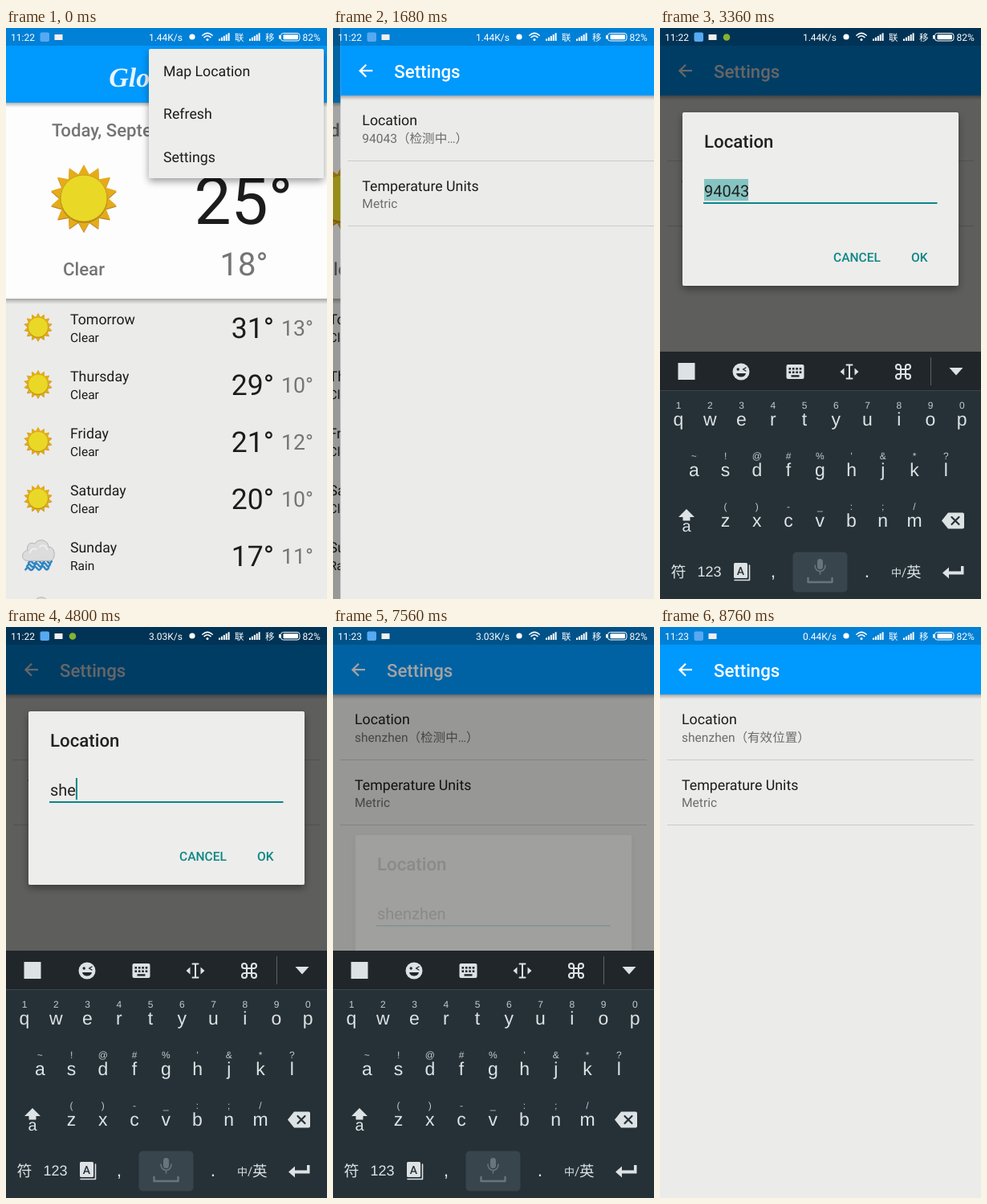
An HTML page that plays this animation: 400x711 px, repeating every 9.12 s.

```html
<!DOCTYPE html>
<html lang="zh-CN">
<head>
<meta charset="utf-8">
<title>Weather settings</title>
<style>
  html, body { margin: 0; width: 100%; height: 100%; overflow: hidden; background: #ebebea; }
  svg { display: block; width: 400px; height: 711px; }
  text { font-family: Roboto, "Noto Sans CJK SC", "Noto Sans CJK", sans-serif; white-space: pre; text-rendering: geometricPrecision; }
  .brand { font-family: "Liberation Serif", "Noto Serif", serif; font-style: italic; font-weight: 700; }
  .key { font-family: "Liberation Sans", "Noto Sans CJK SC", sans-serif; text-anchor: middle; }
  .medium { font-weight: 500; }
  .mid { text-anchor: middle; }
  .end { text-anchor: end; }
  .line { fill: none; stroke-linecap: round; stroke-linejoin: round; }
</style>
</head>
<body>
<svg id="stage" viewBox="0 0 400 711" xmlns="http://www.w3.org/2000/svg"></svg>
<script>
const LOOP = 9120, STEP = 120;
const BLUE = '#0099fd', BAR = '#0080d6', INK = '#1c1c1c', GREY = '#757575';
const TEAL = '#0a8785', KEY = '#dde2e4', DARK = '#20262a', BODY = '#253137';

const text = (x, y, size, str, fill = INK, cls = '', id = '') =>
  `<text x="${x}" y="${y}" font-size="${size}" fill="${fill}" class="${cls}" id="${id}">${str}</text>`;
const rect = (x, y, w, h, fill, more = '') =>
  `<rect x="${x}" y="${y}" width="${w}" height="${h}" fill="${fill}" ${more}/>`;
const path = (d, fill, more = '') => `<path d="${d}" fill="${fill}" ${more}/>`;
const line = (d, color, width) =>
  `<path d="${d}" class="line" stroke="${color}" stroke-width="${width}"/>`;
const circle = (x, y, r, fill, more = '') =>
  `<circle cx="${x}" cy="${y}" r="${r}" fill="${fill}" ${more}/>`;
const at = (x, y, body, scale = 1) =>
  `<g transform="translate(${x} ${y}) scale(${scale})">${body}</g>`;

// Weather icons
function sun(x, y, scale) {
  const rays = 14, pts = [];
  for (let i = 0; i < rays * 2; i++) {
    const a = i * Math.PI / rays - Math.PI / 2, r = i % 2 ? 30.5 : 42;
    pts.push((r * Math.cos(a)).toFixed(1) + ',' + (r * Math.sin(a)).toFixed(1));
  }
  const star = (dy, fill) => `<polygon points="${pts.join(' ')}" fill="${fill}" transform="translate(0 ${dy})"/>`;
  return at(x, y, star(1.2, '#b8862a') + star(0, '#e6ab1a') +
    circle(0, 1.2, 29.5, '#a88318') + circle(0, 0, 29, '#e9d926', 'stroke="#c9a01c" stroke-width="1"'), scale);
}

function rain(x, y) {
  const cloud = 'M-13 11C-22 11-21-1-13-2C-15-10-8-13-4-10C0-18 13-15 13-6C22-7 23 11 14 11Z';
  let drops = '';
  for (let row = 0; row < 3; row++)
    drops += line(`M${-12 - row * 1.8} ${14 + row * 4}` + 'q2.4-4.4 4.8-1t4.8-.5t4.8 0t4.8-.5t4.8 0t4.8-.5', '#2f86c4', 2.6);
  return at(x, y, drops + path(cloud, '#dcdcdc', 'stroke="#b2b2b2" stroke-width="1"') +
    line('M-10 1C-9-4-5-5-2-3M2-6C5-10 10-8 11-3', '#f1f1f1', 1.6));
}

// Home screen
const days = [['Tomorrow', 31, 13], ['Thursday', 29, 10], ['Friday', 21, 12],
  ['Saturday', 20, 10], ['Sunday', 17, 11], ['Monday', 18, 11]];

function dayRow([name, high, low], i) {
  const wet = i > 3;
  return at(0, i * 71.1,
    (wet ? rain(40, 368) : sun(40, 372.5, .425)) +
    text(80, 369, 17.78, name) + text(80, 391, 15.56, wet ? 'Rain' : 'Clear') +
    text(334, 386, 35.56, high + '°', INK, 'end') + text(383, 383, 26.67, low + '°', GREY, 'end'));
}

const home = rect(0, 0, 400, 711, '#ebebea') + days.map(dayRow).join('') +
  rect(0, 337, 400, 7, 'url(#shade)') + rect(0, 93, 400, 244, '#fdfdfd') +
  rect(0, 93, 400, 6, 'url(#shade)') + rect(0, 22, 400, 71, BLUE) + rect(0, 0, 400, 22, BAR) +
  text(200, 73, 34, 'Glowmere', '#e9f4fc', 'brand mid') +
  text(57, 135, 22.22, 'Today, September 27 | 94043', GREY, 'medium') +
  sun(97, 212, 1) + text(71, 308, 22.22, 'Clear', GREY, 'medium') +
  text(234.5, 244, 82, '25°') + text(266.5, 308, 40, '18°', GREY);

const menu = rect(178, 26, 218, 161, '#ededec', 'rx="2" filter="url(#lift)"') +
  rect(178, 134, 218, 53, '#000', 'id="menuTap" opacity="0"') +
  ['Map Location', 'Refresh', 'Settings'].map((s, i) => text(196, 60 + i * 53.4, 17.78, s)).join('');

// Settings screen
const settings = rect(0, 0, 400, 711, '#ebebea') +
  '<g clip-path="url(#rowClip)">' + circle(204, 125, 10, '#000', 'id="ripple" opacity="0"') + '</g>' +
  rect(0, 84, 400, 6, 'url(#shade)') + rect(0, 22, 400, 62, BLUE) + rect(0, 0, 400, 22, BAR) +
  path('M40 52.1V54.3H27.2L32.8 59.9L31.2 61.5L22.8 53.2L31.2 44.9L32.8 46.5L27.2 52.1Z', '#fff') +
  text(67, 62, 22.22, 'Settings', '#fff', 'medium') +
  text(27, 121, 17.78, 'Location') + text(27, 143, 15.56, '', '#6c6c6c', '', 'place') +
  rect(9, 165, 382, 1, '#cbcbca') +
  text(27, 203, 17.78, 'Temperature Units') + text(27, 224, 15.56, 'Metric', '#6c6c6c') +
  rect(9, 246, 382, 1, '#cbcbca');

const dialog = rect(28, 105, 344, 216, '#ededec', 'rx="2" filter="url(#lift)"') +
  text(55, 149, 22.22, 'Location', '#212121', 'medium') +
  rect(55, 188, 55, 27, '#86c4c1', 'id="mark"') +
  text(55, 210, 20, '', '#212121', '', 'entry') +
  rect(54, 217, 291.5, 2, TEAL) + rect(0, 188, 2, 27, TEAL, 'id="caret"') +
  rect(302, 266, 44, 40, '#000', 'rx="2" id="okTap" opacity="0"') +
  text(216, 291, 15.56, 'CANCEL', TEAL, 'medium') + text(313, 291, 15.56, 'OK', TEAL, 'medium');

// Keyboard
const PITCH = 39.25;
const keyRows = [
  { x: 23, y: 495, keys: 'qwertyuiop', hints: '1234567890' },
  { x: 42.3, y: 558, keys: 'asdfghjkl', hints: "~!@#%'&*?" },
  { x: 81.5, y: 621, keys: 'zxcvbnm', hints: '()-_:;/' }
];
const keyPos = {};
const keyCaps = keyRows.map(row => [...row.keys].map((k, i) => {
  const x = row.x + i * PITCH, hint = row.hints[i] === '&' ? '&amp;' : row.hints[i];
  keyPos[k] = [x, row.y];
  return text(x, row.y, 23, k, KEY, 'key') + text(x, row.y - 21.5, 12, hint, '#c3cacd', 'key');
}).join('')).join('');

let dots = '';
for (let i = 0; i < 8; i++) dots += rect(-8 + (i % 4) * 4.4, -5 + (i >> 2) * 4.4, 2.6, 2.6, DARK);

const toolIcons = rect(22.5, 417, 21, 21, KEY) +
  at(101, 428, circle(0, 0, 10.5, KEY) + circle(-3.8, -3, 1.7, DARK) +
    line('M6 -5L2.5 -3L6 -1', DARK, 1.4) + path('M-6 2H6C5 8-5 8-6 2Z', DARK)) +
  at(168.5, 428, rect(-11, -9, 22, 18, KEY, 'rx="2"') + dots + rect(-5, 4.2, 10, 2.4, DARK)) +
  at(236, 428, line('M-3.5 -8.5H3.5M0 -8.5V8.5M-3.5 8.5H3.5', KEY, 2) +
    path('M-6.5 -4.5V4.5L-11.5 0ZM6.5 -4.5V4.5L11.5 0Z', KEY)) +
  at(303, 428, line('M-3-6V6a3 3 0 1 1-3-3H6a3 3 0 1 1-3 3V-6a3 3 0 1 1 3 3H-6a3 3 0 1 1 3-3z', KEY, 2.1)) +
  rect(337, 410, 1, 35, '#5d6468') + path('M360.5 423H377.5L369 432.5Z', KEY);

const bottomRow = text(23, 684, 19, '符', KEY, 'key') + text(61.5, 683, 18, '123', KEY, 'key') +
  at(101, 677, rect(-9, -11, 17, 19, KEY, 'rx="1.5"') + line('M-8 10.5H10.5V-8', KEY, 1.6) +
    text(-.5, 3.5, 14, 'A', BODY, 'medium mid')) +
  text(141, 684, 23, ',', KEY, 'key') +
  rect(165.5, 652.5, 68, 50, '#38454c', 'rx="5"') +
  at(199.5, 672, rect(-3.5, -11, 7, 13, '#69757b', 'rx="3.5"') +
    line('M-6.5 -3C-6.5 7 6.5 7 6.5 -3M0 5V8', '#69757b', 1.6) +
    line('M-15 13V18H15V13', '#69757b', 2.4)) +
  text(258, 684, 23, '.', KEY, 'key') +
  text(288, 683, 13, '中', KEY) + text(301, 683, 15, '/', KEY) + text(307, 684, 18.5, '英', KEY) +
  path('M352 678.5L360 671.5V676.5H375V670H378.5V680.5H360V685.5Z', KEY);

const keyboard = rect(0, 403, 400, 308, BODY) + rect(0, 403, 400, 48, DARK) + rect(0, 451, 400, 1, '#3b474d') +
  rect(0, 459, 35, 56, '#3a474e', 'id="press"') + toolIcons + keyCaps +
  path('M33 599L43 609H37.5V613.5H28.5V609H23Z', KEY) + text(33, 627, 20, 'a', KEY, 'key') +
  path('M351 613.5L359 603.5H377Q379 603.5 379 605.5V621.5Q379 623.5 377 623.5H359Z', KEY) +
  line('M363.5 609L372.5 618M372.5 609L363.5 618', BODY, 2.2) + bottomRow;

// Status bar
function signal(x) {
  let bars = '';
  for (let i = 0; i < 5; i++) bars += rect(x + i * 2.9, 13.5 - i * 1.8, 2, 2.5 + i * 1.8, '#fff');
  return bars;
}
const status = text(6, 16, 12, '', '#fff', '', 'clock') +
  rect(42.5, 5.5, 11.5, 11.5, '#56a9f2', 'rx="2"') + rect(60.5, 8, 10, 7, '#f4eeee') +
  circle(83, 11.5, 4.3, '#86b32d', 'id="note"') +
  text(220, 16, 12, '', '#fff', 'end', 'speed') + circle(232, 11, 3.6, '#fff') +
  line('M244.8 9.2Q251 3.6 257.2 9.2M247 11.6Q251 8 255 11.6', '#fff', 1.5) + circle(251, 14.4, 1.5, '#fff') +
  signal(265) + text(285, 15.5, 11.5, '联', '#fff') + signal(303) + text(323, 15.5, 11.5, '移', '#fff') +
  rect(342.5, 6.5, 23.5, 9.5, 'none', 'rx="3" stroke="#fff"') + rect(340, 9, 2, 4.5, '#fff') +
  rect(345.5, 8.3, 18.5, 6, '#fff', 'rx="1"') + text(369.5, 16, 12, '82%', '#fff');

const stage = document.getElementById('stage');
stage.innerHTML = `<defs>
  <linearGradient id="shade" x2="0" y2="1"><stop stop-color="#000" stop-opacity=".3"/><stop offset=".5" stop-color="#000" stop-opacity=".13"/><stop offset="1" stop-color="#000" stop-opacity="0"/></linearGradient>
  <filter id="lift" x="-10%" y="-10%" width="120%" height="125%"><feDropShadow dx="0" dy="4" stdDeviation="5" flood-opacity=".38"/></filter>
  <clipPath id="rowClip"><rect x="9" y="84" width="382" height="81"/></clipPath></defs>
  <g id="home">${home}<g id="menu">${menu}</g></g>
  ${rect(0, 0, 400, 711, '#000', 'id="homeDim"')}
  <g id="settings">${settings}</g>
  ${rect(0, 0, 400, 711, '#000', 'id="scrim"')}
  <g id="dialog">${dialog}</g><g id="keyboard">${keyboard}</g>${status}`;

const el = {};
stage.querySelectorAll('[id]').forEach(n => { if (n.id) el[n.id] = n; });

// Motion
const taps = [['s', 3840], ['h', 4320], ['e', 4680], ['n', 5040], ['z', 5400], ['h', 5880], ['e', 6240], ['n', 6600]];
const ramp = (t, start, len) => Math.min(1, Math.max(0, (t - start) / len));
const smooth = p => p * p * (3 - 2 * p);
const fade = (n, v) => n.setAttribute('opacity', v);
const move = (n, x, y) => n.setAttribute('transform', `translate(${x} ${y})`);
const label = (n, s) => { if (n.textContent !== s) n.textContent = s; };

function draw(t) {
  const slide = smooth(ramp(t, 1080, 660));
  move(el.home, -87 * slide, 0);
  fade(el.homeDim, .36 * slide);
  move(el.settings, 400 * (1 - slide), 0);
  fade(el.menu, 1 - ramp(t, 600, 300));
  fade(el.menuTap, .09 * ramp(t, 240, 240));

  const saved = t >= 7440;
  const found = saved ? t >= 8400 : t >= 2160;
  label(el.place, (saved ? 'shenzhen' : '94043') + (found ? '（有效位置）' : '（检测中…）'));
  el.ripple.setAttribute('r', Math.max(0, 186 + (t - 2760) * .375));
  fade(el.ripple, t < 2400 ? 0 : .06 * (1 - ramp(t, 2760, 360)));

  fade(el.scrim, .6 * (ramp(t, 2760, 300) - ramp(t, 7380, 450)));
  fade(el.dialog, ramp(t, 2650, 200) - ramp(t, 7380, 200));
  move(el.dialog, 0, saved ? 154 : 0);
  fade(el.okTap, t >= 7080 && t < 7440 ? .1 : 0);

  const rise = 1 - (1 - ramp(t, 2680, 370)) ** 2, drop = ramp(t, 7620, 420) ** 2;
  move(el.keyboard, 0, 308 * (1 - rise + drop));

  const typed = taps.filter(k => t >= k[1] + STEP);
  const word = typed.map(k => k[0]).join('');
  label(el.entry, word || '94043');
  fade(el.mark, word ? 0 : 1);
  const idle = word ? t - typed[typed.length - 1][1] - STEP : 0;
  fade(el.caret, word && !saved && idle % 1000 < 500 ? 1 : 0);
  el.caret.setAttribute('x', 55 + el.entry.getComputedTextLength());

  const hit = taps.find(k => t >= k[1] && t < k[1] + STEP);
  fade(el.press, hit ? 1 : 0);
  if (hit) {
    const [x, y] = keyPos[hit[0]];
    el.press.setAttribute('x', x - 17.5);
    el.press.setAttribute('y', y - 36);
  }

  label(el.clock, t < 6600 ? '11:22' : '11:23');
  label(el.speed, (t < 3960 ? '1.44' : t < 8040 ? '3.03' : '0.44') + 'K/s');
  fade(el.note, t >= 2640 && !saved ? 1 : 0);
}

const begin = performance.now();
function tick() {
  const t = (performance.now() - begin) % LOOP;
  draw(Math.floor(t / STEP) * STEP);
  requestAnimationFrame(tick);
}
tick();
</script>
</body>
</html>
```
